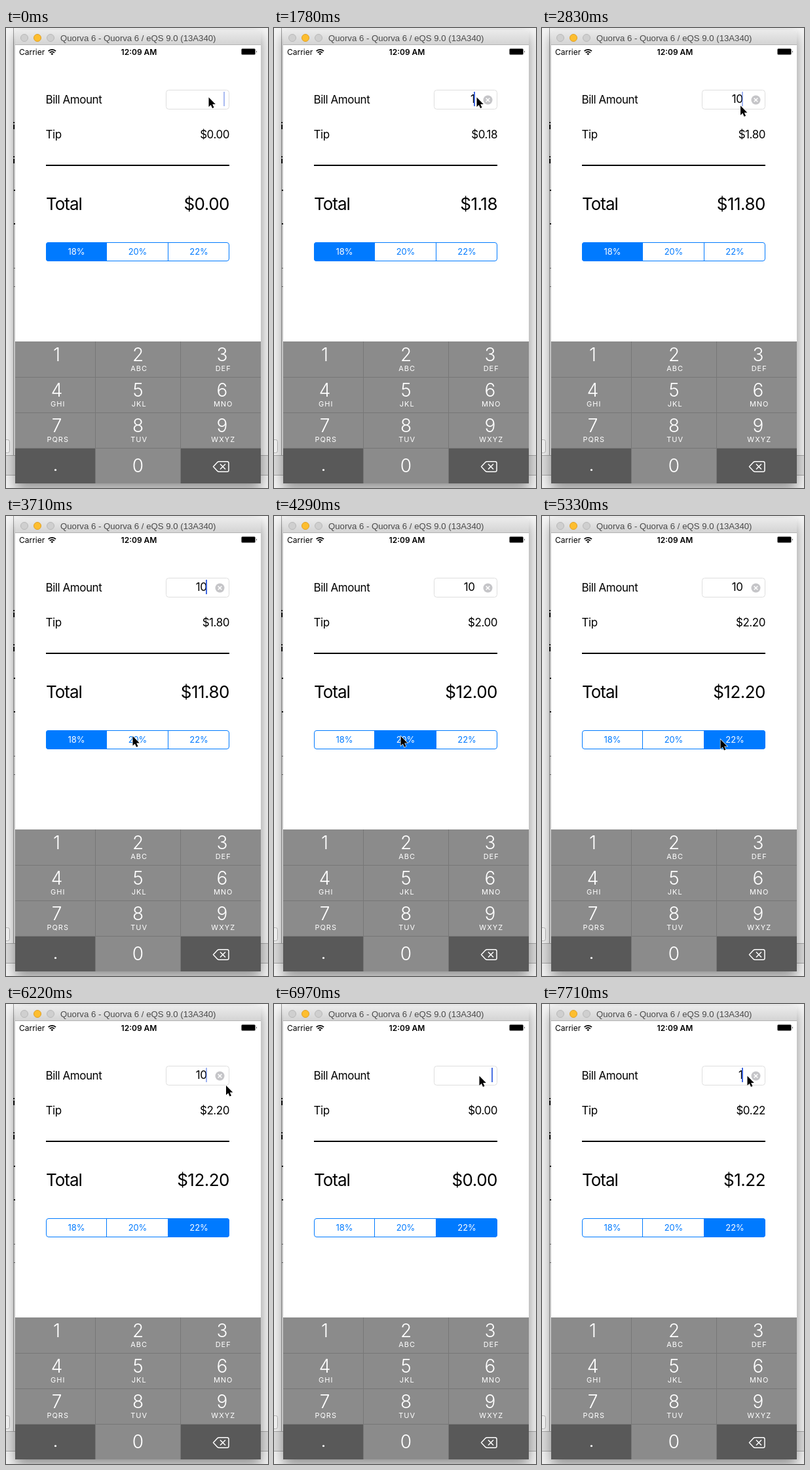
Recreate the animation shown at these times as an HTML page. Size 400 by 700 pixels, loop 8000 ms.

```html
<!DOCTYPE html>
<html lang="en">
<head>
<meta charset="utf-8">
<title>Tip calculator</title>
<style>
  html, body { margin: 0; width: 100%; height: 100%; overflow: hidden; background: #f3f3f3; }
  svg { display: block; width: 400px; height: 700px; font-family: Inter, sans-serif; }
  #title { font: 13.2px "Liberation Sans", Arial, sans-serif; fill: #4b4b4b; }
  #window { filter: drop-shadow(0 9px 10px rgba(0, 0, 0, .42)); }
  .status { font-size: 12px; }
  .body { font-size: 17px; letter-spacing: -.45px; }
  .big { font-size: 26px; letter-spacing: -.5px; }
  .end { text-anchor: end; }
  .mid { text-anchor: middle; }
  #total-label { letter-spacing: -1px; }
  #segments text { font-size: 13px; letter-spacing: -.1px; }
  #keys { fill: #fff; text-anchor: middle; }
  #keys .digit { font-size: 28px; font-weight: 300; }
  #keys .letters { font-size: 11px; letter-spacing: 1px; }
</style>
</head>
<body>
<svg viewBox="0 0 400 700">
  <defs>
    <linearGradient id="bar" x2="0" y2="1">
      <stop stop-color="#ebebeb"/><stop offset="1" stop-color="#d4d4d4"/>
    </linearGradient>
    <clipPath id="control"><rect x="61" y="326" width="280" height="29" rx="4"/></clipPath>
  </defs>

  <!-- desktop behind the simulator -->
  <rect width="400" height="700" fill="#f5f5f5"/>
  <rect y="650" width="400" height="30" fill="#dedede"/>
  <path d="M0 650.5H400M0 680.5H400" stroke="#aaa"/>
  <path d="M11.5 0V650" stroke="#9a9a9a"/>
  <path d="M12 365.5H16M12 393.5H16" stroke="#777"/>
  <path d="M12 143v2m0 2v7M12 195v2m0 2v7M12 247h3M12 298h3" stroke="#111" stroke-width="2"/>
  <rect x="-8.5" y="626.5" width="14" height="20" rx="3" fill="#fafafa" stroke="#bbb"/>

  <path id="window" d="M14 693V8a5 5 0 0 1 5-5H384a5 5 0 0 1 5 5V693Z" fill="#fff"/>
  <path d="M14 25V8a5 5 0 0 1 5-5H384a5 5 0 0 1 5 5V25Z" fill="url(#bar)"/>
  <path d="M14 25.5H389" stroke="#b4b4b4"/>
  <g fill="#cfcfcf" stroke="#b8b8b8">
    <circle cx="28" cy="15" r="5.5"/>
    <circle cx="48" cy="15" r="5.5" fill="#fdbe2f" stroke="#e0a026"/>
    <circle cx="68" cy="15" r="5.5"/>
  </g>
  <text id="title" x="83" y="20">Quorva 6 - Quorva 6 / eQS 9.0 (13A340)</text>

  <text class="status" x="20" y="41">Carrier</text>
  <g fill="none" stroke="#000" stroke-width="1.7">
    <path d="M64.6 35.2a8 8 0 0 1 11.4 0M66.7 37.6a5 5 0 0 1 7.2 0"/>
    <path d="M70.3 41.2l-1.9-2a2.7 2.7 0 0 1 3.8 0z" fill="#000" stroke="none"/>
  </g>
  <text class="status mid" x="203" y="41" font-weight="600">12:09 AM</text>
  <rect x="359.5" y="31.5" width="21" height="9" rx="1.5" fill="#000" stroke="#777" stroke-width=".6"/>
  <path d="M382 34.2q1.8 1.8 0 3.6z"/>

  <text class="body" x="60.5" y="115">Bill Amount</text>
  <rect x="244.5" y="94.5" width="96" height="29" rx="4" fill="#fff" stroke="#dedede"/>
  <text class="body end" id="bill" x="306.5" y="114"></text>
  <g id="clear">
    <circle cx="326.5" cy="109.5" r="7" fill="#c5c5c8"/>
    <path d="M323.7 106.7l5.6 5.6m0-5.6l-5.6 5.6" stroke="#fff" stroke-width="1.5"/>
  </g>
  <rect id="caret" y="97" width="2" height="22" fill="#4169e1"/>

  <text class="body" x="60.5" y="168">Tip</text>
  <text class="body end" id="tip" x="341" y="168"></text>
  <path d="M61 209H341" stroke="#000" stroke-width="2"/>
  <text class="big" id="total-label" x="61" y="277">Total</text>
  <text class="big end" id="total" x="341" y="277"></text>

  <g id="segments"></g>
  <g id="keys"></g>

  <path id="pointer" d="M0 0V14.5L3.3 11.4 5.5 16.6 8 15.5 5.7 10.5H10.3Z"
        stroke="#fff" stroke-width="1.2" paint-order="stroke"/>
</svg>

<script>
const $ = id => document.getElementById(id);
const TICKS = 54, LOOP = 8000;
const BLUE = '#007aff';

// Segmented control
const rates = [18, 20, 22], edges = [61, 153.5, 247.5, 341];
$('segments').innerHTML = '<g clip-path="url(#control)">' +
  rates.map((r, i) => `<rect class="fill" x="${edges[i]}" y="326" width="${edges[i + 1] - edges[i]}" height="29"/>`).join('') +
  `</g><path d="M153.5 327V354M247.5 327V354" stroke="${BLUE}"/>
  <rect x="61.5" y="326.5" width="279" height="28" rx="3.5" fill="none" stroke="${BLUE}"/>` +
  rates.map((r, i) => `<text class="mid" x="${107.5 + i * 93.5}" y="345">${r}%</text>`).join('');
const fills = document.querySelectorAll('#segments .fill');
const labels = document.querySelectorAll('#segments text');

// Number pad
const letters = ['', 'ABC', 'DEF', 'GHI', 'JKL', 'MNO', 'PQRS', 'TUV', 'WXYZ'];
const columns = [77.5, 201.5, 330];
const digit = (x, y, s) => `<text class="digit" x="${x}" y="${y}">${s}</text>`;
$('keys').innerHTML = `
  <rect x="14" y="477" width="375" height="216" fill="#8b8b8b"/>
  <path d="M14 639H136V693H14ZM266 639H389V693H266Z" fill="#595959"/>
  <path d="M14 531.5H389M14 585.5H389M14 639.5H389M136.5 477V693M266.5 477V693" stroke="#777"/>` +
  letters.map((s, i) => {
    const x = columns[i % 3], y = 507 + 54 * Math.floor(i / 3);
    return digit(x, y, i + 1) + `<text class="letters" x="${x + 1.7}" y="${y + 15}">${s}</text>`;
  }).join('') + digit(201.5, 676, 0) + `
  <circle cx="75.5" cy="672.5" r="1.6"/>
  <g fill="none" stroke="#fff" stroke-width="1.5" stroke-linejoin="round">
    <path d="M316.5 667.5L323 660.6Q324 659.7 325.5 659.7H337.5Q340 659.7 340 662V673Q340 675.3 337.5 675.3H325.5Q324 675.3 323 674.4Z"/>
    <path d="M327 663.5l8 8m0-8l-8 8"/>
  </g>`;

// Hard changes: [tick, value]
const bills = [[0, ''], [12, '1'], [16, '10'], [44, ''], [52, '1']];
const selected = [[0, 0], [29, 1], [36, 2]];
const pressed = [[0, -1], [28, 1], [29, -1], [35, 2], [36, -1]];
const carets = [[0, .45], [1, 0], [3, .5], [4, 1], [7, .5], [8, 0], [10, .5], [12, 1],
  [19, .5], [20, 0], [22, .5], [23, 1], [27, .5], [28, 0], [30, .5], [31, 1],
  [34, .5], [35, 0], [37, .5], [39, 1], [42, .5], [43, 0], [44, 1], [47, .95],
  [48, .5], [49, 0], [51, .5], [52, 1]];
const at = (track, k) => track.findLast(([start]) => start <= k)[1];

// Pointer stops, eased in between: [tick, x, y]
const stops = [[0, 309.5, 105.5], [18, 309.5, 105.5], [25, 193.5, 335], [29, 193.5, 335],
  [34, 272.5, 340], [38, 272.5, 340], [42, 336, 124], [44, 320, 112],
  [46, 320, 112], [47, 313.5, 109.5], [54, 313.5, 109.5]];
function pointerAt(k) {
  const i = stops.findLastIndex(s => s[0] <= k);
  const [t0, x0, y0] = stops[i], [t1, x1, y1] = stops[i + 1];
  const u = (k - t0) / (t1 - t0), e = u * u * (3 - 2 * u);
  return [x0 + (x1 - x0) * e, y0 + (y1 - y0) * e];
}

const money = v => '$' + v.toFixed(2);
function draw(k) {
  const bill = at(bills, k), active = at(selected, k), touched = at(pressed, k);
  const tip = bill * rates[active] / 100;
  $('bill').textContent = bill;
  $('tip').textContent = money(tip);
  $('total').textContent = money(+bill + tip);
  $('clear').style.display = bill ? '' : 'none';
  $('caret').setAttribute('x', bill ? 305 : 332);
  $('caret').setAttribute('opacity', at(carets, k));
  fills.forEach((f, i) => {
    f.setAttribute('fill', i === active ? BLUE : i === touched ? '#d9ebff' : '#fff');
    labels[i].setAttribute('fill', i === active ? '#fff' : BLUE);
  });
  $('pointer').setAttribute('transform', `translate(${pointerAt(k)})`);
}

const start = performance.now();
let shown = -1;
function frame() {
  const t = (performance.now() - start) % LOOP;
  const k = Math.min(TICKS - 1, Math.floor((t + 8) * TICKS / LOOP));
  if (k !== shown) draw(shown = k);
  requestAnimationFrame(frame);
}
frame();
</script>
</body>
</html>
```
